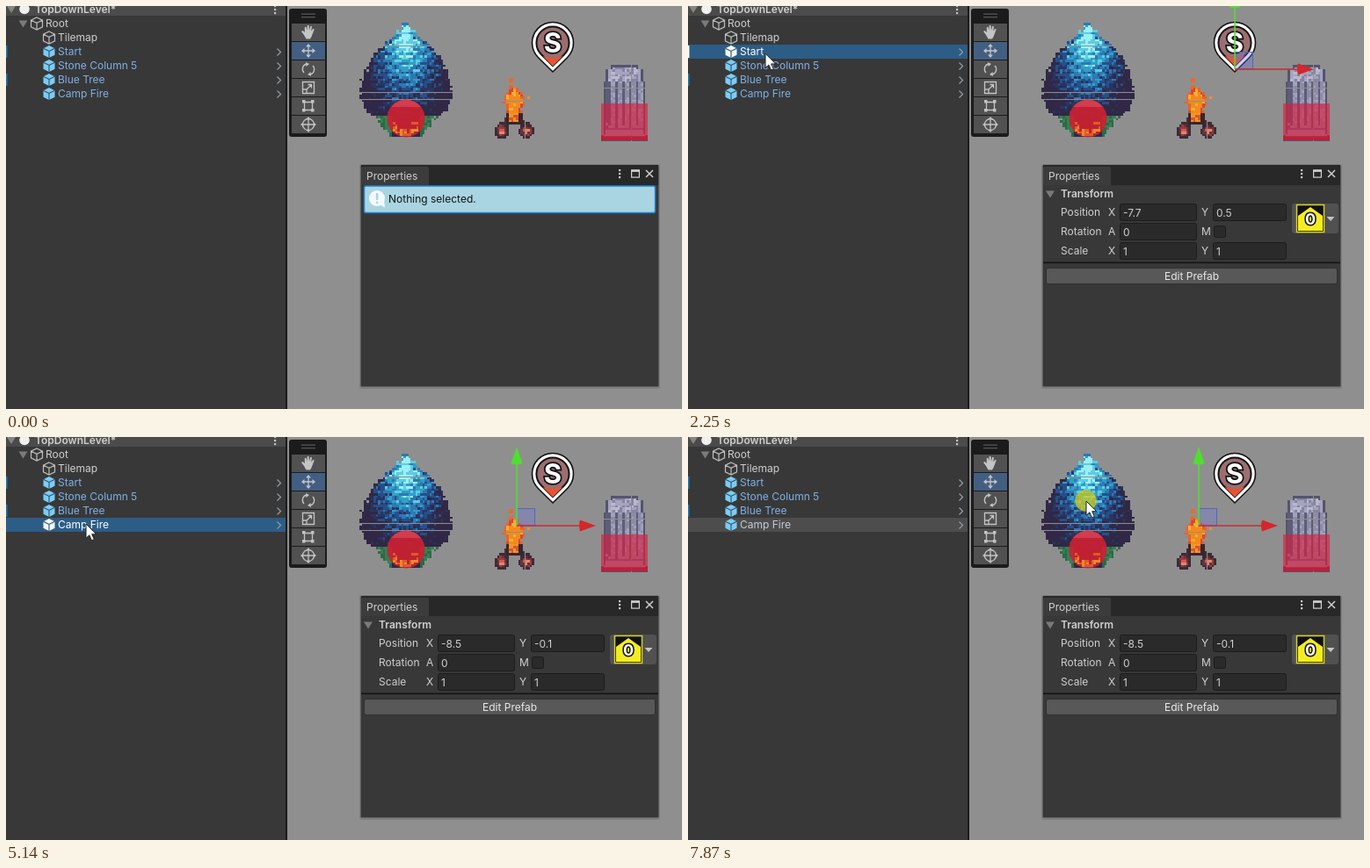
Animation, 769 px wide and 459 px high, one loop 8000 ms. Source, as an HTML page:

```html
<!DOCTYPE html>
<html lang="en">
<head>
<meta charset="utf-8">
<title>Scene editor</title>
<style>
html, body { margin: 0; width: 100%; height: 100%; overflow: hidden; background: #383838; }
svg { display: block; width: 769px; height: 459px; }
text { font: 12px Inter, "Liberation Sans", sans-serif; fill: #d0d0d0; white-space: pre; }
.b { font-weight: 600; }
.crisp { shape-rendering: crispEdges; }
.ico { fill: none; stroke: #c4c4c4; stroke-width: 1.3; }
</style>
</head>
<body>
<svg id="stage" viewBox="0 0 769 459"></svg>
<script>
const LOOP = 8000;
const stage = document.getElementById('stage');

// ---- markup helpers
const rect = (x, y, w, h, fill, more = '') =>
  `<rect x="${x}" y="${y}" width="${w}" height="${h}" fill="${fill}" ${more}/>`;
const path = (d, more) => `<path d="${d}" ${more}/>`;
const text = (x, y, s, more = '') => `<text x="${x}" y="${y}" ${more}>${s}</text>`;
const dots = (x, y, step, c) =>
  [0, 1, 2].map(i => rect(x - 1, y + i * step, 2.2, 2.2, c)).join('');
const group = (id, s) => `<g id="${id}">${s}</g>`;

// ---- pixel sprites: a colour rule sampled on a grid
const CELL = 2.65;
const hash = (i, j) => { const v = Math.sin(i * 127.1 + j * 311.7) * 43758.5453; return v - Math.floor(v); };
function sprite(x0, y0, x1, y1, rule) {
  const paths = {};
  for (let j = 0, y = y0; y < y1 - 0.5; j++, y = y0 + j * CELL)
    for (let i = 0, x = x0; x < x1 - 0.5; i++, x = x0 + i * CELL) {
      const c = rule(x + CELL / 2, y + CELL / 2, hash(i, j));
      if (c) paths[c] = (paths[c] || '') + `M${x.toFixed(1)} ${y.toFixed(1)}h${CELL}v${CELL}h-${CELL}z`;
    }
  return '<g class="crisp">' + Object.entries(paths).map(([c, d]) => path(d, `fill="${c}"`)).join('') + '</g>';
}
function along(pts, y) {
  for (let i = 1; i < pts.length; i++) {
    const [a, u] = pts[i - 1], [b, v] = pts[i];
    if (y <= b) return u + (v - u) * (y - a) / (b - a);
  }
  return 0;
}

const LEAF = ['#302846', '#293560', '#264f8a', '#2f78b2', '#309fc6', '#5fcbe2', '#9af0f6'];
const TREE = [[18, 2], [24, 6], [36, 14], [42, 24], [50, 32], [60, 40], [70, 45], [82, 50], [96, 54], [108, 51], [120, 46], [127, 34], [138, 27], [150, 14]];
function tree(x, y, h) {
  const dx = Math.abs(x - 455), edge = along(TREE, y) - dx + (h - 0.6) * 5;
  if (edge < 0) return null;
  if (y > 125 && dx > 17) return h > 0.5 ? '#2c6a48' : '#3a7d52';
  const band = (y / 11 + Math.floor(dx / 8) % 2 * 0.5) % 1;
  let l = 1 - Math.hypot(dx / 52, (y - 38) / 90) * 0.98 + (0.5 - band) * 0.35 + (h - 0.5) * 0.28;
  if (edge < 4) l -= 0.2;
  return LEAF[Math.max(0, Math.min(6, Math.floor(l * 7)))];
}

const FLAME = [[93, 3], [97, 7], [102, 11], [108, 12], [114, 10], [122, 8]];
function fire(x, y, h) {
  const dx = x - 579, ax = Math.abs(dx + 1);
  if (y < 93) return (ax > 2 && ax < 5 && dx < 0 && (y < 87 || y > 90)) ? '#ea6a2a' : null;
  if (y < 122) {
    const in_ = along(FLAME, y) - ax + (h - 0.5) * 3;
    if (in_ > 3.5) return h > 0.8 ? '#f7ae35' : '#f28a1e';
    if (in_ > 0) return h > 0.35 ? '#ec6227' : '#d9472f';
    return dx > 15 && dx < 18 && y > 102 && y < 106 ? '#f0902a' : null;
  }
  const r = Math.hypot(ax - 14, y - 142);
  if (r < 3) return h > 0.5 ? '#e8836f' : '#cf5a55';
  if (r < 6) return h > 0.5 ? '#8d3f3e' : '#6b3338';
  if (r < 8.7) return '#3d2b36';
  if (y < 136 && ax < 10) return ax < 5 && y > 122 && y < 133 ? (h > 0.4 ? '#f2952a' : '#d9552f') : '#35272f';
  return y < 142 && Math.abs(ax - 8 - (y - 132) * 0.5) < 4 ? '#442e38' : null;
}

function stone(x, y, h) {
  const [l, r] = y < 71 ? [688, 719] : y < 85 ? [683, 724] : y < 146 ? [680, 728] : [677, 731];
  if (x < l || x > r) return null;
  if (x < l + 3 || x > r - 3 || y < 70 || y > 150) return '#55546d';
  if (y < 85) return h > 0.75 ? '#8585a2' : h > 0.3 ? '#a4a4be' : '#b9b8cd';
  if (y < 138 - (h > 0.5) * 4) return (x - 684) % 8 < 2.7 ? '#5d5d78' : h > 0.6 ? '#a1a1bb' : '#8c8ca8';
  return y > 139 && y < 142 ? '#666680' : '#9494af';
}

// ---- scene
const pin = k => {
  const r = 23.5 * k, tip = 33 * k, a = Math.asin(r / tip), px = r * Math.cos(a), py = r * Math.sin(a);
  return `M${622 - px} ${42 + py}A${r} ${r} 0 1 1 ${622 + px} ${42 + py}L622 ${42 + tip}Z`;
};
const scene =
  rect(320, 0, 449, 459, '#8f8f8f') +
  sprite(402, 19, 508, 149, tree) +
  '<circle cx="455" cy="128" r="21.5" fill="#cf2131" fill-opacity=".9"/>' +
  path('M438 115A21.5 21.5 0 0 1 472 115Z', 'fill="#df4a5c" opacity=".65"') +
  sprite(440, 132, 471, 148, (x, y, h) =>
    Math.hypot(x - 455, y - 128) < 20 && h < (y - 128) / 20 ? (h > 0.35 ? '#e88a2c' : '#de5a25') : null) +
  sprite(556, 82, 604, 151, fire) +
  path(pin(1), 'fill="#fff" stroke="#111" stroke-width="1.6"') +
  path(pin(0.79), 'fill="#9b6e70" stroke="#111" stroke-width="2"') +
  path('M610.5 57Q622 61.5 633.5 57L622 68.5Z', 'fill="#ea5230"') +
  text(622, 53, 'S', 'text-anchor="middle" style="font-size:31px;font-weight:700;fill:#fff;stroke:#111;stroke-width:3.5px;paint-order:stroke"') +
  sprite(677, 67, 731, 153, stone) +
  rect(677, 111, 53, 42, '#de1c3e', 'opacity=".62"') + rect(677, 148, 53, 5, '#c4152f', 'opacity=".6"');

const knob = (x, y) => rect(x - 5, y - 5, 10, 10, '#ffee00');
const stoneEdit = rect(677.5, 111.5, 52, 41, 'none', 'stroke="#fff"') +
  [[677, 111], [730, 111], [677, 153], [730, 153], [703, 132]].map(p => knob(...p)).join('');
const treeEdit = '<circle cx="455" cy="128" r="21.5" fill="none" stroke="#fff"/>' +
  [[455, 107], [455, 149], [433, 128], [477, 128], [455, 128]].map(p => knob(...p)).join('');
const gizmo =
  rect(0.5, -19.5, 20, 19, '#6a78e0', 'fill-opacity=".35" stroke="#5566b8"') +
  rect(-0.7, -72, 1.6, 72, '#55dc32') + path('M0 -90L6.5 -71Q0 -68 -6.5 -71Z', 'fill="#4fdf2e"') +
  rect(0, -0.7, 74, 1.5, '#cf2a33') + path('M90 0L72 -6.5Q70 0 72 6.5Z', 'fill="#d6262a"');

// ---- toolbar
const ICONS = [
  path('M339 33l-3-4 1.6-1 2.2 2v-6l1.6-.3.8 4 .6-5.700h1.700l.5 5.700 1.300-5 1.600.5-.6 5.500 2-3 1.400.9-3.200 8.500-1.500 2.500h-4.500z', 'fill="#c4c4c4"'),
  path('M344 45v12M338 51h12', 'class="ico"') +
    path('M344 43l3 3.500h-6zM344 59l3-3.500h-6zM336 51l3.500-3v6zM352 51l-3.500-3v6z', 'fill="#c4c4c4"'),
  path('M339 76a6 6 0 0 1 3-10M349 68a6 6 0 0 1-3 10', 'class="ico"') +
    path('M341 64l4 2-3.500 3zM347 80l-4-2 3.500-3z', 'fill="#c4c4c4"'),
  path('M337.500 86.500h13v13h-13zM337.500 95h4.500v4.500M342 95l5-5M343.500 89.500h4v4', 'class="ico"'),
  path('M339.500 109.500h9v9h-9z', 'class="ico"') +
    [[339, 109], [349, 109], [339, 119], [349, 119]].map(([x, y]) => rect(x - 2, y - 2, 3.5, 3.5, '#c4c4c4')).join(''),
  '<circle cx="344" cy="135" r="6.500" class="ico"/>' + path('M344 129v12M338 135h12', 'class="ico"') +
    path('M344 126l2.500 3h-5zM344 144l2.500-3h-5zM335 135l3-2.500v5zM353 135l-3-2.500v5z', 'fill="#c4c4c4"'),
];
const toolbar =
  group('extra', rect(322, 140, 43, 33, '#1b1b1b', 'rx="3"') + rect(325, 149, 38, 20, '#515151') +
    path('M339 163Q340 155 344 155Q348 155 349 163', 'class="ico"') +
    [[344, 155], [339, 163], [349, 163]].map(([x, y]) => rect(x - 2, y - 2, 4, 4, '#c4c4c4')).join('')) +
  rect(322, 3, 43, 146, '#1b1b1b', 'rx="3"') +
  group('grip', rect(336, 8.5, 16, 1.3, 'currentColor') + rect(336, 12, 16, 1.3, 'currentColor')) +
  ICONS.map((ic, i) => rect(325, 20 + 21 * i, 38, 20, i == 1 ? '#425f82' : '#515151') + ic).join('');

// ---- hierarchy
const ROWS = ['Root', 'Tilemap', 'Start', 'Stone Column 5', 'Blue Tree', 'Camp Fire'];
const rowY = i => 12 + 16 * i;
const cube = (x, y, solid) => {
  const hex = `M${x} ${y - 7}l6.500 3.200v7.600l-6.500 3.200l-6.500 -3.200v-7.600z`;
  const ribs = `M${x - 6.5} ${y - 3.8}l6.500 3.200l6.500 -3.200M${x} ${y - 0.6}v7.600`;
  return solid
    ? path(hex, 'fill="currentColor"') + path(ribs, 'fill="none" stroke="#2f4f66" stroke-width="1.100"')
    : path(hex + ribs, 'fill="none" stroke="#bdbdbd" stroke-width="1.200"');
};
const row = (s, i) => {
  const y = rowY(i), x = i ? 49 : 35, prefab = i > 1;
  return rect(0, y, 318, 16, 'none', `id="bg${i}"`) +
    (i == 2 || i == 4 ? rect(0, y + 1, 1.5, 14, '#0f81be', `id="bar${i}"`) : '') +
    group('cube' + i, cube(x, y + 8, prefab)) + text(x + 10, y + 12, s, `id="name${i}"`) +
    (prefab ? path(`M308.500 ${y + 4.5}l4 4l-4 4`, 'fill="none" stroke="#8d99a3" stroke-width="1.300"') : '');
};
const hierarchy =
  rect(0, 0, 318, 459, '#383838') + rect(0, 0, 318, 11, '#4b4b4b') + rect(318, 0, 2, 459, '#1b1b1b') +
  path('M1 0h10l-5 8z', 'fill="#858585"') + '<circle cx="21" cy="3.500" r="5.800" fill="#f0f0f0"/>' +
  text(33, 8, 'TopDownLevel*', 'class="b"') + dots(306, -1, 4, '#c4c4c4') +
  path('M14.500 16.500h10l-5 8z', 'fill="#7a7a7a"') + ROWS.map(row).join('');

// ---- properties window
const field = (x, y, w, s, id = '') =>
  rect(x + 0.5, y + 0.5, w - 1, 19, '#2a2a2a', 'rx="2" stroke="#1c1c1c"') + text(x + 4, y + 15, s, id);
const label = (y, name, a, b) => text(424, y, name) + text(478, y, a) + (b ? text(584, y, b) : '');
const details =
  path('M407 210.500h10l-5 8z', 'fill="#7a7a7a"') + text(424, 218, 'Transform', 'class="b"') +
  label(239, 'Position', 'X', 'Y') + label(261, 'Rotation', 'A', 'M') + label(283, 'Scale', 'X', 'Y') +
  field(491, 225, 88, '', 'id="posX"') + field(597, 225, 84, '', 'id="posY"') +
  field(491, 247, 88, '0') + field(491, 269, 88, '1') + field(597, 269, 84, '1') +
  rect(598.5, 250.5, 13, 13, '#2a2a2a', 'rx="2" stroke="#1c1c1c"') +
  rect(687, 225, 53, 34, '#515151', 'rx="3"') +
  rect(692.5, 226.5, 31, 31, '#111', 'stroke="#d8d21c" stroke-width="1.500"') +
  path('M694 239L708 229L722 239V256H694Z', 'fill="#f4ec22"') +
  text(708, 249, '0', 'text-anchor="middle" style="font-size:18px;font-weight:700;fill:#fff;stroke:#111;stroke-width:3px;paint-order:stroke"') +
  path('M726.500 240h9l-4.500 5z', 'fill="#c4c4c4"') +
  rect(404, 291.5, 338, 1.6, '#141414') +
  rect(407.5, 298.5, 331, 18, '#585858', 'rx="2.500" stroke="#303030"') +
  text(573, 312, 'Edit Prefab', 'text-anchor="middle" style="fill:#eaeaea"');
const notice =
  rect(407.5, 205, 331, 30.5, '#a9d5e2', 'rx="2" stroke="#1f7fd6" stroke-width="1.500"') +
  '<circle cx="422" cy="219" r="9" fill="#f4fafc"/>' + path('M425 226l6 3.500-1-8z', 'fill="#f4fafc"') +
  rect(420.8, 213, 2.6, 8, '#a9d5e2', 'rx="1"') + rect(420.8, 222.5, 2.6, 2.6, '#a9d5e2', 'rx="1"') +
  text(435, 224, 'Nothing selected.', 'style="fill:#101010"');
const panel =
  rect(402, 180, 342, 256, '#000', 'opacity=".12" rx="3"') + rect(403, 181, 340, 253, '#000', 'opacity=".25" rx="2"') +
  rect(404, 181, 338, 252, '#383838') + rect(404, 181, 338, 23, '#282828') +
  path('M404 204v-19q0-2 2-2h73q2 0 2 2v19z', 'fill="#3c3c3c"') + text(410, 198, 'Properties') +
  dots(698, 186, 4, '#c8c8c8') +
  rect(711.6, 187.1, 8.8, 8, 'none', 'stroke="#d0d0d0" stroke-width="1.200"') + rect(711, 186.5, 10, 2.4, '#d0d0d0') +
  path('M728 187l8 8M736 187l-8 8', 'fill="none" stroke="#d0d0d0" stroke-width="1.500"') +
  group('notice', notice) + group('details', details);

stage.innerHTML = scene + group('stoneEdit', stoneEdit) + group('treeEdit', treeEdit) + group('gizmo', gizmo) +
  toolbar + hierarchy + panel +
  '<circle id="ring" r="12.200" fill="#c9cb22" fill-opacity=".78"/>' +
  group('cursor', path('M0 0V16.200L3.800 12.800L6.500 18.800L9.300 17.500L6.700 11.700H11.700Z',
    'fill="#fff" stroke="#222" stroke-width="1" stroke-linejoin="round"'));

// ---- timeline
const MOVES = [ // start, end, from x y, to x y, sag
  [460, 1240, 500, 457, 88, 61, 0],
  [1250, 1370, 88, 61, 88, 54, 0],
  [2230, 2500, 88, 54, 89, 66, 0],
  [3390, 3540, 89, 66, 90, 82, 0],
  [4420, 4730, 90, 82, 91, 99, 0],
  [5500, 6310, 91, 99, 350, 54, 43],
  [7090, 7400, 350, 54, 453, 73, 0],
];
const PICKS = [ // click, end of the ring, row, gizmo x y, position
  [1770, 1880, 2, 622, 72, '-7.7', '0.5'],
  [2840, 2940, 3, 703, 100, '-6.2', '-0.05'],
  [3940, 4040, 4, 455, 84, '-10.9', '0.2'],
  [5040, 5140, 5, 581, 101, '-8.5', '-0.1'],
];
const RINGS = [...PICKS, [6720, 6810], [7870, LOOP]];
const BLUR = 6720, LAG = 65;

const ui = {};
stage.querySelectorAll('[id]').forEach(el => ui[el.id] = el);
const show = (el, on) => el.style.display = on ? '' : 'none';
const place = (el, x, y) => el.setAttribute('transform', `translate(${x.toFixed(2)} ${y.toFixed(2)})`);
const ease = p => p * p * (3 - 2 * p);

function pointer(t) {
  const m = MOVES.filter(k => t >= k[0]).pop();
  if (!m) return null;
  const [a, b, x0, y0, x1, y1, sag] = m, e = ease(Math.min(1, (t - a) / (b - a)));
  return [x0 + (x1 - x0) * e, y0 + (y1 - y0) * e + sag * Math.sin(Math.PI * e)];
}

function draw(t) {
  const at = pointer(t);
  const [x, y] = at || [-99, -99];
  show(ui.cursor, at);
  place(ui.cursor, x, y);
  show(ui.ring, RINGS.some(([a, b]) => t >= a && t < b));
  place(ui.ring, x - 0.5, y - 0.5);
  ui.grip.style.color = x > 322 && x < 365 && y < 149 ? '#b8b8b8' : '#555';

  const picked = PICKS.filter(p => t >= p[0]).pop();
  const focus = t < BLUR;
  ROWS.forEach((_, i) => {
    const sel = picked && picked[2] == i, lit = sel && focus;
    const hover = x >= 0 && x < 318 && y >= rowY(i) && y < rowY(i) + 16;
    ui['bg' + i].setAttribute('fill', lit ? '#2c5d87' : sel ? '#4d4d4d' : hover ? '#444' : 'none');
    if (i < 2) return;
    ui['cube' + i].style.color = lit ? '#f4f8fb' : '#7bcdf5';
    ui['name' + i].style.fill = lit ? '#fff' : sel ? '#c4cdd4' : '#7fb1e8';
    if (ui['bar' + i]) ui['bar' + i].setAttribute('fill', lit ? '#fff' : '#0f81be');
  });

  const live = PICKS.filter(p => t >= p[0] + LAG).pop();
  const id = live ? live[2] : 0;
  show(ui.notice, !live);
  show(ui.details, live);
  show(ui.gizmo, live);
  show(ui.stoneEdit, id == 3);
  show(ui.treeEdit, id == 4);
  show(ui.extra, id == 3 || id == 4);
  if (live) {
    place(ui.gizmo, live[3], live[4]);
    ui.posX.textContent = live[5];
    ui.posY.textContent = live[6];
  }
}

const begin = performance.now();
function tick() {
  draw((performance.now() - begin) % LOOP);
  requestAnimationFrame(tick);
}
tick();
</script>
</body>
</html>
```
